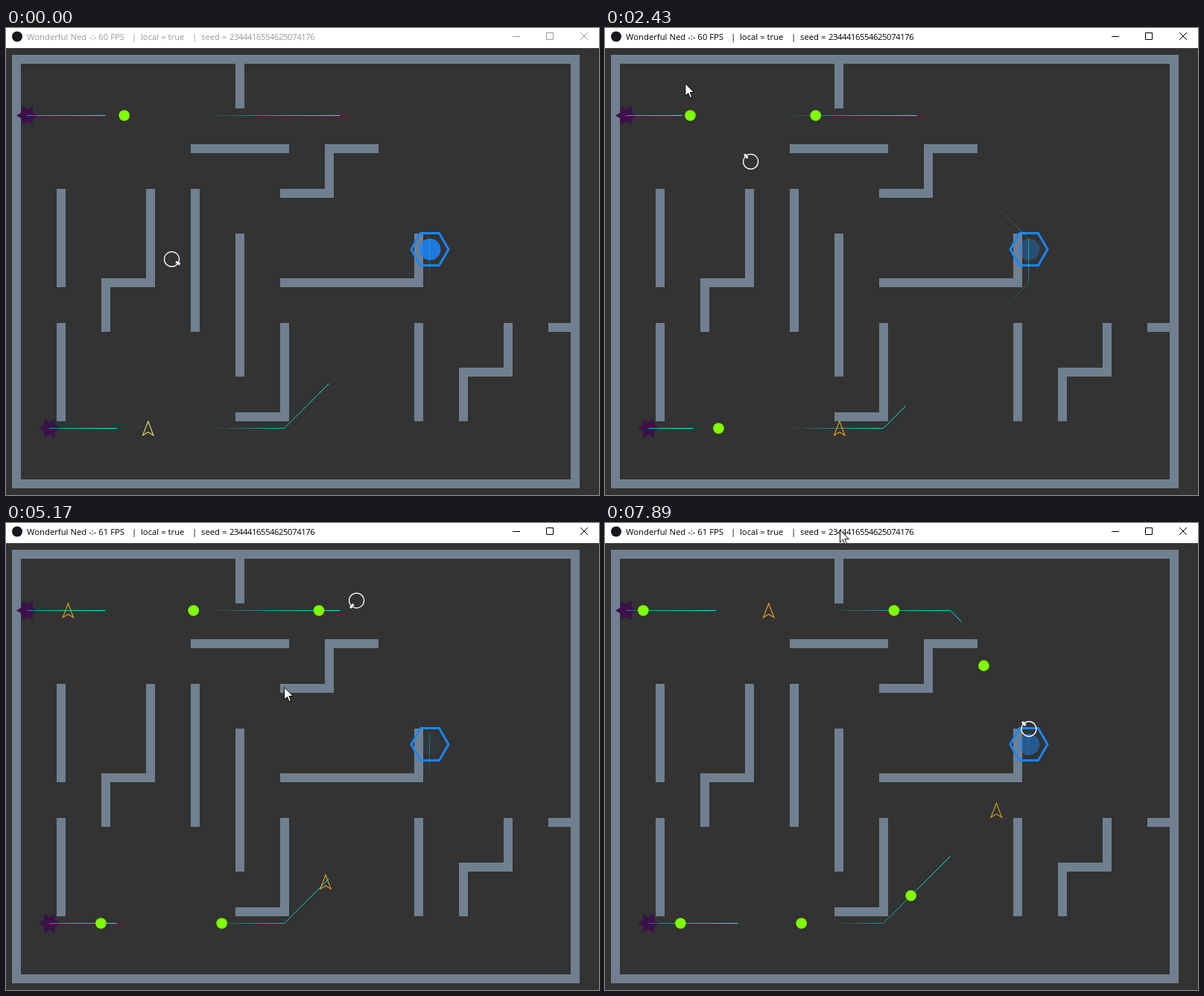
Animation, 796 px wide and 627 px high, one loop 7940 ms. Source, as an HTML page with a canvas:

```html
<!DOCTYPE html>
<html lang="en">
<head>
<meta charset="utf-8">
<title>Maze game</title>
<style>
  html, body { margin: 0; width: 796px; height: 627px; overflow: hidden; background: #323332; }
  #bar {
    position: absolute; left: 0; top: 0; width: 796px; height: 27px; background: #fff;
    font: 11.3px/23px "Open Sans", "Noto Sans", sans-serif; white-space: pre;
  }
  #bar span { position: absolute; top: 0; }
  #bar .seed { letter-spacing: -.45px; }
  canvas { position: absolute; left: 0; top: 0; }
</style>
</head>
<body>
<div id="bar">
  <span id="name" style="left:28px"></span>
  <span style="left:169px">|</span>
  <span style="left:181px">local = true</span>
  <span style="left:250px">|</span>
  <span style="left:262px">seed =</span>
  <span class="seed" style="left:300px">2344416554625074176</span>
</div>
<canvas id="stage" width="796" height="627"></canvas>
<script>
const LOOP = 7940, FOCUS_AT = 1200, STEP = 15;
const SPEED = .0501, DASH_PERIOD = 1308;
const ctx = document.getElementById('stage').getContext('2d');
const bar = document.getElementById('bar');
const nameLabel = document.getElementById('name');

// Walls on a 60 px grid
const walls = new Path2D(`M0 0H12.5V9.5H0Z M5 0V1 M4 2H6 M8 2H7V3H6 M1 3V5 M3 3V5H2V6
  M4 3V6 M5 4V7 M9 4V5H6 M1 6V8 M6 6V8H5 M9 6V8 M11 6V7H10V8 M12 6H12.5`);
const buttons = new Path2D('M680 11.5H690 M725.5 6.5H734.5V15.5H725.5Z M771 6L781 16 M781 6L771 16');
const cursorShape = new Path2D('M.5 .5V17L4.3 13.4 7 19.5 9.4 18.4 6.8 12.4H12.2Z');
const shipShape = new Path2D('M0 -9.5L7.2 9.5 0 5 -7.2 9.5Z');

// Key points: time, player x y, mouse x y
const poses = [
  [0, 222, 310, 480, 471], [1680, 231.5, 251, 209, 130], [2430, 195, 179, 107, 74],
  [3730, 312.5, 117.5, 592, 205], [4840, 434, 107, 632, 238], [5170, 470, 103.5, 373, 220],
  [6800, 564.5, 216, 602, 385], [7890, 568.5, 276, 315, 9]
];

function poseAt(t) {
  const last = poses.length - 1;
  const i = Math.max(0, Math.min(last - 1, poses.findLastIndex(p => p[0] <= t)));
  const a = poses[i], b = poses[i + 1];
  const u = Math.min(1, (t - a[0]) / (b[0] - a[0]));
  return a.slice(1).map((v, k) => v + (b[k + 1] - v) * u);
}

// Each leg: dx, dy, number of steps
function makeRoute(x, y, legs) {
  const nodes = [[x, y]];
  for (const [dx, dy, n] of legs)
    for (let i = 0; i < n; i++) nodes.push([x += dx * STEP, y += dy * STEP]);
  return nodes;
}

const lanes = [
  {
    nodes: makeRoute(28.5, 117.5, [[1, 0, 29], [1, 1, 3], [0, 1, 4], [1, 1, 4], [0, 1, 1]]),
    size: 43, shift: 0, first: -130.2, gap: 168.3, kinds: 'oovo'
  },
  {
    nodes: makeRoute(58.5, 537.5, [[1, 0, 21], [1, -1, 13], [0, -1, 3]]),
    size: 38, shift: .32, first: -132.2, gap: 162.3, kinds: 'vooo'
  }
];

function pointAt(nodes, d) {
  for (let i = 1; i < nodes.length; i++) {
    const [x, y] = nodes[i - 1], dx = nodes[i][0] - x, dy = nodes[i][1] - y;
    const len = Math.hypot(dx, dy);
    if (d <= len) return [x + dx * d / len, y + dy * d / len];
    d -= len;
  }
  return nodes[nodes.length - 1];
}

function polygon(x, y, n, radius) {
  ctx.beginPath();
  for (let i = 0; i < n; i++) {
    const a = i * 2 * Math.PI / n, r = radius(i);
    ctx.lineTo(x + r * Math.cos(a), y + r * Math.sin(a));
  }
  ctx.closePath();
}

function circle(x, y, r) {
  ctx.beginPath();
  ctx.arc(x, y, r, 0, 2 * Math.PI);
}

function stroke(color, width, shape) {
  ctx.strokeStyle = color;
  ctx.lineWidth = width;
  shape ? ctx.stroke(shape) : ctx.stroke();
}

function fill(color, shape) {
  ctx.fillStyle = color;
  shape ? ctx.fill(shape) : ctx.fill();
}

function at(x, y, draw) {
  ctx.save();
  ctx.translate(x, y);
  draw();
  ctx.restore();
}

function drawTitle(t) {
  const ink = t < FOCUS_AT ? '#999' : '#000';
  const fps = 60 + +'001011001'[Math.floor((t + 700) / 1000)];
  const text = `Wonderful Ned -:- ${fps} FPS`;
  if (nameLabel.textContent !== text) nameLabel.textContent = text;
  bar.style.color = ink;
  circle(15, 11.5, 7);
  fill('#15181c');
  stroke(ink, 1, buttons);
}

// Two dashes per lane, each fading towards its tail
function drawDashes({ nodes, size, shift }, phase) {
  const length = size / 4;
  for (const half of [0, .5]) {
    const head = Math.floor((phase % 1 * .5 + half) * size + shift);
    for (let k = 0; k < length; k++) {
      const i = (head - 1 - k + size) % size;
      if (i >= nodes.length - 1) continue;
      ctx.globalAlpha = (1 - k / length) ** .7;
      ctx.beginPath();
      ctx.moveTo(...nodes[i]);
      ctx.lineTo(...nodes[i + 1]);
      stroke('#00f0f5', 1);
    }
  }
  ctx.globalAlpha = 1;
}

function drawEnemies({ nodes, first, gap, kinds }, dist, t) {
  const warm = Math.min(1, t / 800);
  const shipColor = `rgb(230,${218 - 54 * warm},${120 - 80 * warm})`;
  [...kinds].forEach((kind, i) => {
    const d = dist - first - i * gap;
    if (d < 0) return;
    const [x, y] = pointAt(nodes, d);
    if (kind === 'o') {
      circle(x, y, 7.3);
      fill('#7fff00');
    } else {
      at(x, y, () => stroke(shipColor, 1.1, shipShape));
    }
  });
}

function drawBase(dist) {
  ctx.globalAlpha = Math.abs(Math.cos(dist / 50 - 3.72));
  circle(569, 297.2, 14.5);
  fill('#1a86ff');
  ctx.globalAlpha = 1;
  polygon(569, 297.2, 6, () => 25);
  stroke('#1a86ff', 3);
}

function drawPlayer(x, y, mx, my) {
  at(x + .5, y + .5, () => {
    circle(0, 0, 10);
    stroke('#fff', 1.3);
    ctx.rotate(Math.atan2(my - y, mx - x));
    ctx.fillStyle = '#fff';
    ctx.fillRect(6.5, -1.5, 6.5, 3);
  });
}

function draw(t) {
  // The game runs a touch fast just after it starts
  const game = t + 45 * Math.min(1, t / 500);
  const dist = game * SPEED;
  const phase = .34 + game / DASH_PERIOD;
  const [px, py, mx, my] = poseAt(t);
  ctx.clearRect(0, 0, 796, 627);
  drawTitle(t);
  at(14, 42, () => {
    ctx.scale(60, 60);
    ctx.lineCap = 'square';
    stroke('#708090', .2, walls);
  });
  for (const { nodes: [[x, y]] } of lanes) {
    polygon(x, y, 12, i => i % 2 ? 8.6 : 14.6);
    fill('#3a1249');
  }
  drawBase(dist);
  for (const lane of lanes) drawDashes(lane, phase);
  for (const lane of lanes) drawEnemies(lane, dist, t);
  drawPlayer(px, py, mx, my);
  if (t >= 30) at(mx, my, () => {
    fill('#fff', cursorShape);
    stroke('#000', 1, cursorShape);
  });
}

const start = performance.now();
function tick() {
  draw((performance.now() - start) % LOOP);
  requestAnimationFrame(tick);
}
tick();
</script>
</body>
</html>
```
